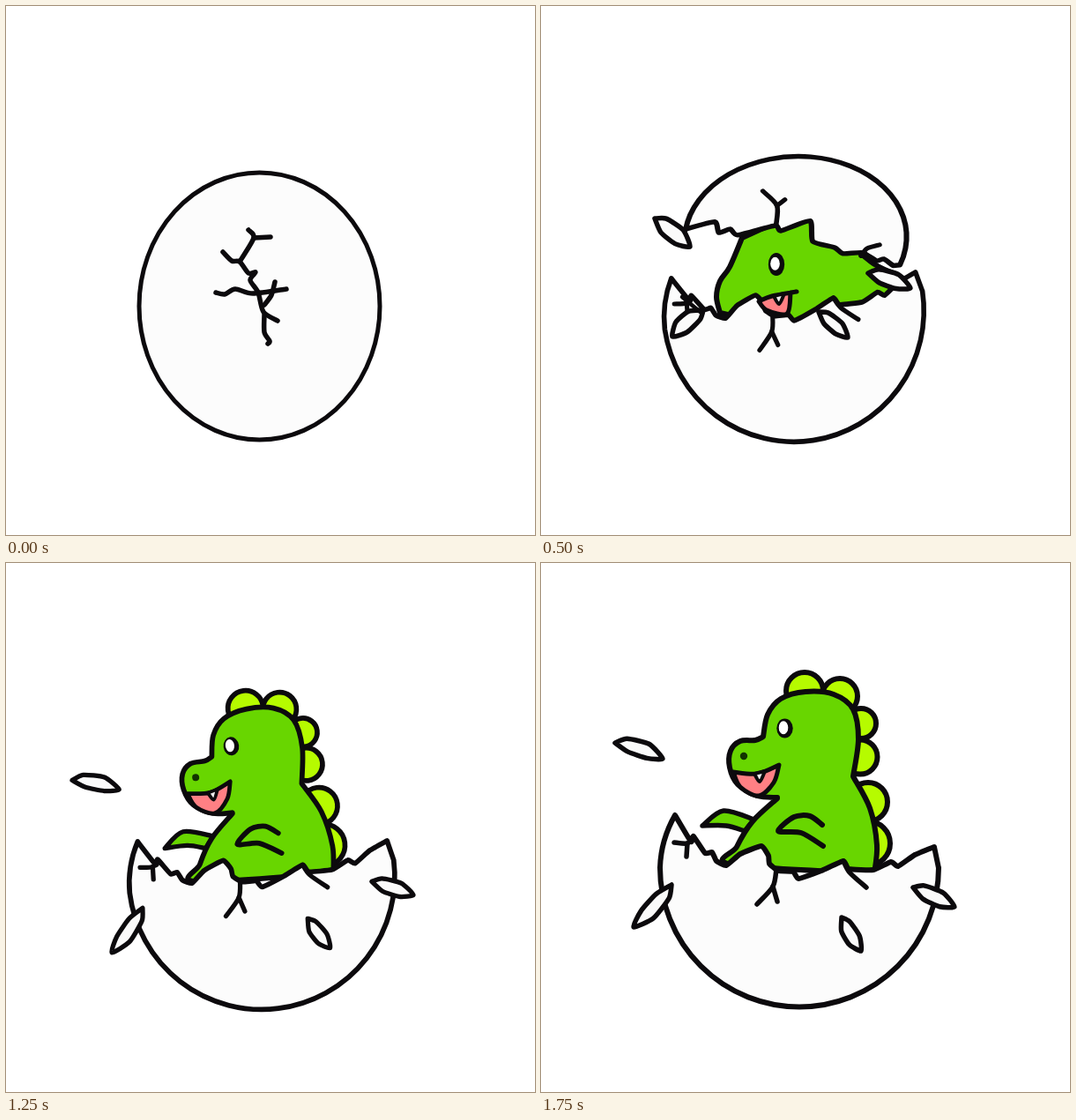
Animation of 600x600 px, one loop 2000 ms. Source, as an HTML page with a canvas:

```html
<!DOCTYPE html>
<html lang="en">
<head>
<meta charset="utf-8">
<title>Hatching egg</title>
<style>
  html, body { margin: 0; width: 100%; height: 100%; overflow: hidden; background: #fff; }
  canvas { display: block; width: 600px; height: 600px; }
</style>
</head>
<body>
<canvas id="stage" width="600" height="600"></canvas>
<script>
const ctx = document.getElementById('stage').getContext('2d');
const INK = '#0c0a0d', SHELL = '#fcfcfc', GREEN = '#68d600', LIME = '#b6fb00', PINK = '#ff8084';
const STEP = 250;

// Append a soft curve through flat x,y points; k sets the roundness.
function curve(p, k, join) {
  const last = p.length / 2 - 1;
  const at = i => {
    const j = 2 * Math.max(0, Math.min(last, i));
    return [p[j], p[j + 1]];
  };
  if (join) ctx.lineTo(p[0], p[1]); else ctx.moveTo(p[0], p[1]);
  for (let i = 0; i < last; i++) {
    const [a, b, c, d] = [at(i - 1), at(i), at(i + 1), at(i + 2)];
    ctx.bezierCurveTo(b[0] + (c[0] - a[0]) * k, b[1] + (c[1] - a[1]) * k,
                      c[0] - (d[0] - b[0]) * k, c[1] - (d[1] - b[1]) * k, c[0], c[1]);
  }
}

function paint(fill, width) {
  if (fill) { ctx.fillStyle = fill; ctx.fill(); }
  if (width) { ctx.lineWidth = width; ctx.strokeStyle = INK; ctx.stroke(); }
}

function line(p, width = 5.5) {
  ctx.beginPath();
  curve(p, 0.14);
  paint(null, width);
}

function blob(fill, width, ...parts) {
  ctx.beginPath();
  parts.forEach((p, i) => curve(p, 0.16, i > 0));
  ctx.closePath();
  paint(fill, width);
}

function oval(x, y, rx, ry, fill, width) {
  ctx.beginPath();
  ctx.ellipse(x, y, rx, ry, 0, 0, Math.PI * 2);
  paint(fill, width);
}

// Crack running from x,y to a joint, where it splits in two.
function fork(x, y, jx, jy, ax, ay, bx, by) {
  line([x, y, jx, jy, ax, ay]);
  line([jx, jy, bx, by]);
}

// Splinter between two tips; a and b are the bulges of its sides.
function shard(x1, y1, x2, y2, a, b) {
  const dx = x2 - x1, dy = y2 - y1, len = Math.hypot(dx, dy);
  const at = (t, off) => [x1 + dx * t - dy / len * off, y1 + dy * t + dx / len * off];
  ctx.beginPath();
  curve([x1, y1, ...at(0.2, -b * 0.8), ...at(0.65, -b), x2, y2, ...at(0.7, a), ...at(0.3, a), x1, y1], 0.1);
  ctx.closePath();
  paint('#fafafa', 5.5);
}

function eye(x, y, ry) {
  oval(x, y, 9.2, ry, INK);
  oval(x - 1.5, y - 0.8, 5.3, 7.5, '#fff');
}

function fang(x, y) {
  blob('#eee', 4, [x - 6, y + 1, x, y + 10, x + 6, y - 2]);
}

// Run a drawing with its pivot moved to x,y, tilted in degrees and scaled.
function pose(x, y, tilt, sx, sy, px, py, part) {
  ctx.save();
  ctx.translate(x, y);
  ctx.rotate(tilt * Math.PI / 180);
  ctx.scale(sx, sy);
  ctx.translate(-px, -py);
  part();
  ctx.restore();
}

function egg(wide) {
  oval(287.5, 340.5, 136.5, 151.5, SHELL, 5);
  fork(265, 290, 281, 263, 275, 254, 300, 262);
  line([246, 279, 256, 289, 265, 290, 275, 303, 283, 302, 277, 311, 286, 325, 292, 347, 308, 357]);
  line([238, 325, 248, 327, 260, 321, 280, 326, 318, 321]);
  line([305, 313, 301, 328, 293, 339]);
  line([293, 350, 293, 370, 299, 380, 297, 383]);
  if (!wide) return;
  for (const [x, y, dx] of [[238, 325, -11.4], [318, 321, 15.5]]) {
    const p = [];
    for (let i = 0; i < 5; i++) p.push(x + dx * i, y + 3 * i - i % 2 * 5);
    line(p);
  }
}

function bowl() {
  ctx.beginPath();
  curve([152, 286, 170, 316, 173, 310, 186, 329, 194, 328, 199, 338, 210, 343, 226, 330, 250, 321, 258, 332,
         259, 341, 269, 349, 286, 350, 292, 358, 318, 349, 343, 338, 349, 347, 377, 348, 397, 339, 405, 344,
         424, 331, 446, 322], 0.07);
  ctx.lineTo(451, 346);
  ctx.ellipse(293, 345.5, 158, 158, 0, 0, Math.PI);
  ctx.quadraticCurveTo(136, 314, 152, 286);
  ctx.closePath();
  paint(SHELL, 6);
  fork(172, 311, 166, 318, 151, 317, 165, 333);
  fork(267, 347, 263, 367, 245, 387, 268, 384);
  line([343, 338, 350, 351, 369, 368]);
}

function lid() {
  ctx.beginPath();
  ctx.ellipse(283, 218, 123.5, 104, 0, Math.PI + 0.17, Math.PI * 2 + 0.38);
  curve([390, 257, 380, 248, 372, 250, 357, 239, 335, 239, 326, 231, 302, 222, 300, 196, 267, 207, 261, 200,
         219, 210, 211, 202, 198, 206, 194, 192, 160, 200], 0.09, true);
  ctx.closePath();
  paint(SHELL, 6);
  fork(262, 200, 264, 175, 249, 156, 273, 168);
  line([355, 243, 362, 234, 376, 230]);
}

function dino() {
  const spikes = [[299, 145, 21], [339, 151, 20], [363, 182, 17], [362, 220, 19.5], [371, 271, 22], [371, 318, 25]];
  for (const [x, y, r] of spikes) oval(x, y, r, r, LIME, 6);
  blob(GREEN, 5.5, [183, 298, 207, 281, 242, 291], [231, 304, 210, 298, 183, 298]);
  blob(GREEN, 6,
    [252, 197, 243, 201, 226, 202, 215, 213, 214, 232, 223, 251, 245, 264, 268, 266],
    [268, 267, 240, 293, 222, 322, 216, 342, 378, 352],
    [378, 352, 381, 320, 373, 278, 354, 242],
    [354, 242, 360, 200, 354, 166, 332, 149, 300, 146, 272, 154, 257, 172, 252, 197]);
  blob(PINK, 5, [218, 237, 245, 239, 270, 229], [270, 229, 264, 249, 247, 264, 226, 254, 218, 237]);
  fang(248, 238);
  eye(276.5, 187.5, 11);
  oval(230, 219, 4.2, 4.2, '#123300');
  line([319, 297, 305, 287, 287, 288, 269, 304, 295, 306, 320, 321], 6);
}

function shards() {
  shard(84, 204, 138, 222, 5, 11);
  shard(148, 365, 105, 413, 6, 10);
  shard(422, 368, 469, 390, 7, 9);
  shard(341, 402, 363, 440, 8, 7);
}

function peek() {
  blob(GREEN, 6, [203, 348, 199, 330, 203, 312, 214, 296, 228, 263], [300, 230, 374, 290, 410, 318, 300, 370]);
  eye(267, 293, 13);
  pose(288, 248, -2.5, 1.02, 0.9, 283, 200, lid);
  pose(286.5, 345, -8.5, 0.935, 0.945, 293, 345.5, bowl);
  blob(PINK, 5, [247, 335, 262, 329, 290, 324], [283, 325, 279, 349, 256, 345, 247, 335]);
  fang(270, 328);
  shard(129, 241, 169, 273, 8, 10);
  shard(371, 303, 419, 320, 6, 10);
  shard(315, 347, 348, 376, 6, 8);
  shard(184, 345, 149, 375, 10, 7);
  line([160, 330, 183, 349], 4.5);
}

function hatched(x, y, tilt, size, covered) {
  const place = part => pose(x, y, tilt, size, size, 293, 345.5, part);
  place(dino);
  if (covered) lid();
  place(bowl);
  place(shards);
}

const scenes = [
  () => egg(false),
  () => egg(true),
  peek,
  () => hatched(290.5, 345, -8, 0.953, true),
  () => hatched(293, 345.5, 0, 1),
  () => hatched(290, 355.5, -7.2, 0.955),
  () => hatched(288.6, 354, -9.5, 0.966),
  () => hatched(293, 345.5, 0, 1)
];

let shown = -1;
function draw() {
  const i = Math.floor(performance.now() / STEP) % scenes.length;
  if (i !== shown) {
    shown = i;
    ctx.fillStyle = '#fff';
    ctx.fillRect(0, 0, 600, 600);
    scenes[i]();
  }
  requestAnimationFrame(draw);
}
ctx.lineCap = ctx.lineJoin = 'round';
draw();
</script>
</body>
</html>
```
